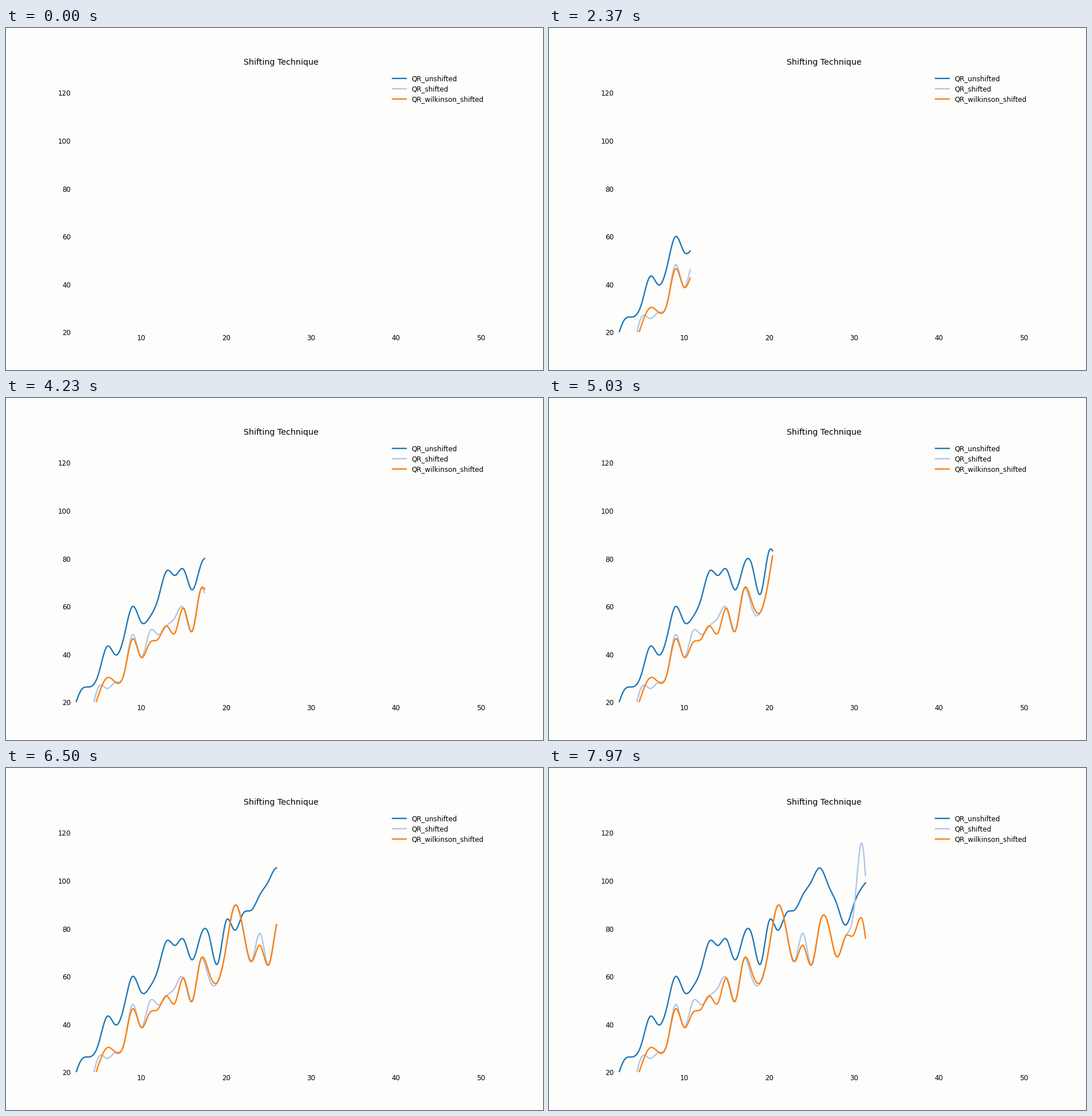
These frames come from a looping animation (938x597 px, 8000 ms). A matplotlib script:

```python
import numpy as np
import matplotlib.pyplot as plt
from matplotlib.animation import FuncAnimation

W, H, DPI = 938, 597, 85.28
BG = "#fdfdfc"
FRAMES = 240
X = np.linspace(2, 51, 400)

# One key value per iteration; the curves are splines through them.
UNSHIFTED = [16, 25.4, 26.5, 32, 43.4, 39.8, 47.6, 60.1, 53.6, 55.5, 63.2,
             74.9, 73, 75.6, 67, 77, 77.3, 65.2, 83.2, 79.4, 86.3, 87.8,
             94.3, 99.8, 105.4, 98, 90.2, 81.5, 90.3, 97.5, 102]
SHIFTED = [12, 26.5, 25.8, 28.4, 32, 48.4, 38.8, 49.5, 48.3, 52, 55.5, 59.4,
           49.6, 67, 59.2, 57.7, 72, 89.6, 80, 66.3, 78.1, 64.8, 82.5, 81.5,
           68.2, 76.8, 88, 115.3, 50]
# The Wilkinson shift follows the plain shift except at these iterations.
WILKINSON = {5: -3.3, 6: 4.5, 9: -1.8, 11: -4.7, 12: -1.9, 14: -6.5,
             18: 2.5, 24: -5, 30: -10.4, 31: -31.6}


def spline(x, start, values):
    """Natural cubic spline through unit-spaced points, nan outside them."""
    v = np.array(values, float)
    n = len(v)
    a = 4 * np.eye(n) + np.eye(n, k=1) + np.eye(n, k=-1)
    a[0, 0] = a[-1, -1] = 2
    padded = np.pad(v, 1, mode="edge")
    m = np.linalg.solve(a, 3 * (padded[2:] - padded[:-2]))

    pos = x - start
    i = np.clip(np.floor(pos).astype(int), 0, n - 2)
    t = pos - i
    y = ((1 + 2 * t) * (1 - t) ** 2 * v[i] + t * (1 - t) ** 2 * m[i]
         + t ** 2 * (3 - 2 * t) * v[i + 1] + t ** 2 * (t - 1) * m[i + 1])
    y[(pos < 0) | (pos > n - 1)] = np.nan
    return y


wilkinson = [v + WILKINSON.get(n, 0) for n, v in enumerate(SHIFTED, start=4)]
SERIES = [
    ("QR_unshifted", "#1f77b4", spline(X, 2, UNSHIFTED)),
    ("QR_shifted", "#aec7e8", spline(X, 4, SHIFTED)),
    ("QR_wilkinson_shifted", "#ff7f0e", spline(X, 4, wilkinson)),
]

plt.rcParams["font.family"] = "DejaVu Sans"
fig, ax = plt.subplots(figsize=((W + 1e-6) / DPI, (H + 1e-6) / DPI), dpi=DPI,
                       facecolor=BG)
fig.subplots_adjust(left=0.125, right=0.9, bottom=0.11, top=0.88)
ax.set_facecolor(BG)
ax.set(xlim=(2, 51), ylim=(20, 130),
       xticks=range(10, 51, 10), yticks=range(20, 121, 20))
ax.set_title("Shifting Technique", pad=6.5)
ax.tick_params(length=0)
for spine in ax.spines.values():
    spine.set_visible(False)

lines = [ax.plot([], [], color=color, lw=2, label=label)[0]
         for label, color, _ in SERIES]
ax.legend(loc="upper right", frameon=False, labelspacing=0.42,
          borderaxespad=0.45)


def update(frame):
    for line, (_, _, y) in zip(lines, SERIES):
        line.set_data(X[:frame + 1], y[:frame + 1])
    return lines


anim = FuncAnimation(fig, update, frames=FRAMES, init_func=lambda: update(0),
                     interval=8000 / FRAMES, repeat=True, repeat_delay=0)
plt.show()
```
